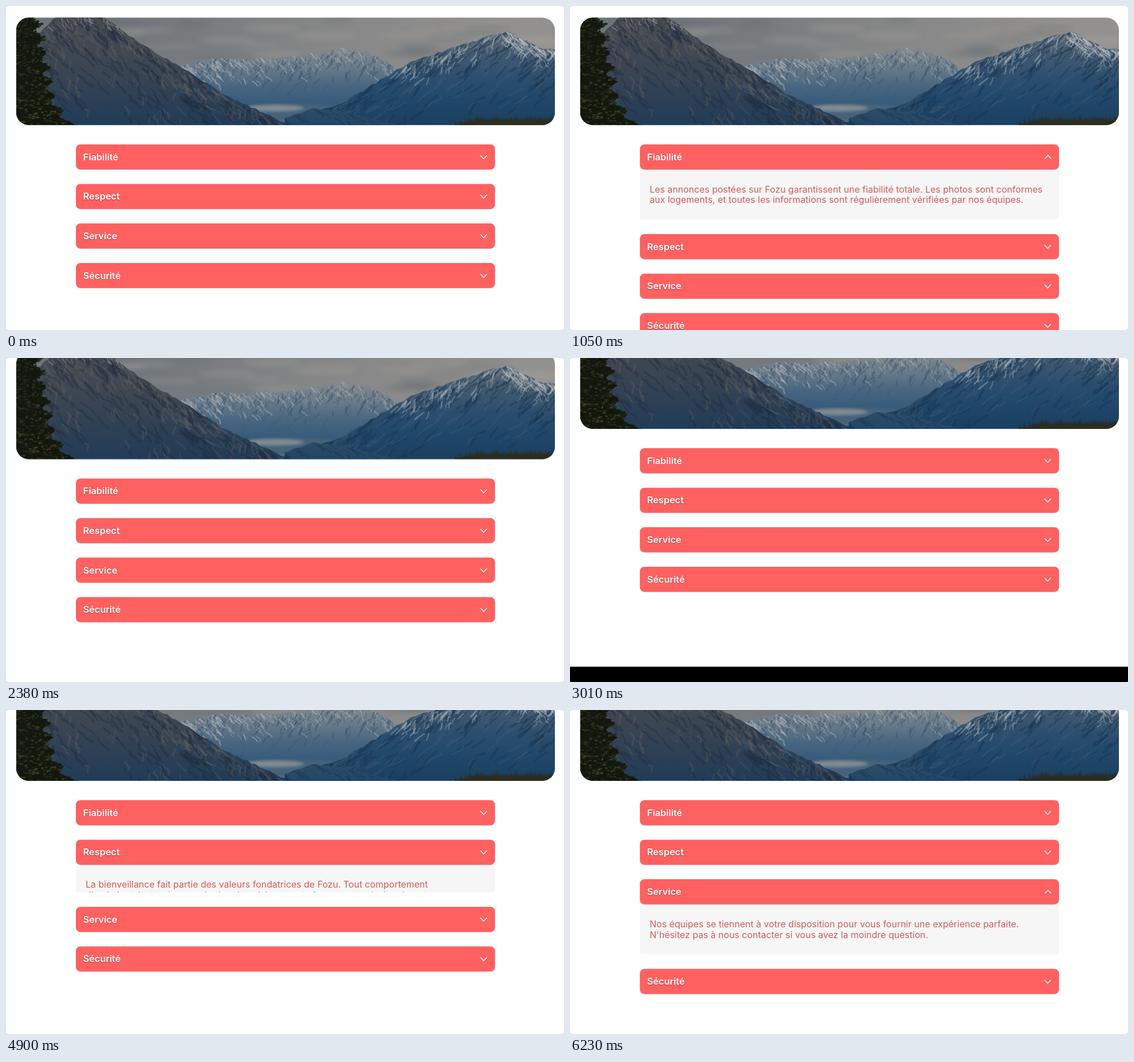
Recreate the animation shown at these times as an HTML page with a canvas. Size 981x571 px, loop 7.63 s.

```html
<!DOCTYPE html>
<html lang="fr">
<head>
<meta charset="utf-8">
<title>Nos valeurs</title>
<style>
html, body { margin: 0; width: 100%; height: 100%; overflow: hidden; background: #fff; }
canvas { display: block; width: 981px; height: 571px; }
</style>
</head>
<body>
<canvas id="stage"></canvas>
<script>
const W = 981, H = 571, LOOP = 7630, TICK = 70;
const OPEN_MS = 400, CLOSE_MS = 540;
const FONT = 'Montserrat, Inter, "Open Sans", sans-serif';
const BANNER = { x: 18, y: 20.5, w: 947, h: 189.2, r: 22 };
const BAR = { x: 123, y: 244, w: 736.6, h: 44, pitch: 69.65, r: 8 };
const LINE = 18.7, PANEL_PAD = 51, FOOTER_Y = 629;
const dpr = window.devicePixelRatio || 1;

const ITEMS = [
  { title: 'Fiabilité', open: 700, close: 1820, lines: [
    'Les annonces postées sur Fozu garantissent une fiabilité totale. Les photos sont conformes',
    'aux logements, et toutes les informations sont régulièrement vérifiées par nos équipes.'] },
  { title: 'Respect', open: 3570, close: 4760, lines: [
    'La bienveillance fait partie des valeurs fondatrices de Fozu. Tout comportement',
    'discriminatoire ou de perturbation du voisinage entraînera une exclusion de notre',
    'plateforme.'] },
  { title: 'Service', open: 5810, close: Infinity, lines: [
    'Nos équipes se tiennent à votre disposition pour vous fournir une expérience parfaite.',
    "N'hésitez pas à nous contacter si vous avez la moindre question."] },
  { title: 'Sécurité', open: Infinity, close: Infinity, lines: [] }
];

function makeCanvas(canvas) {
  canvas.width = W * dpr;
  canvas.height = H * dpr;
  const c = canvas.getContext('2d');
  c.scale(dpr, dpr);
  return c;
}

function roundBox(c, x, y, w, h, r) {
  c.beginPath();
  c.roundRect(x, y, w, h, r);
}

let seed = 41;
function rnd(a = 0, b = 1) {
  seed = (seed * 1664525 + 1013904223) % 4294967296;
  return a + (b - a) * seed / 4294967296;
}

function fade(c, x0, y0, x1, y1, ...colors) {
  const g = c.createLinearGradient(x0, y0, x1, y1);
  colors.forEach((col, i) => g.addColorStop(i / (colors.length - 1), col));
  return g;
}

// Rough skyline through a few key points
function skyline(keys, rough) {
  const line = [];
  for (let i = 1; i < keys.length; i++) {
    const [x0, y0] = keys[i - 1], [x1, y1] = keys[i];
    const n = Math.ceil((x1 - x0) / 8);
    for (let k = 0; k < n; k++) {
      const jitter = k ? rnd(-rough, rough) : 0;
      line.push([x0 + (x1 - x0) * k / n, y0 + (y1 - y0) * k / n + jitter]);
    }
  }
  line.push(keys[keys.length - 1]);
  return line;
}

// Soft strokes running down the slope below a skyline
function slopes(c, line, n, depth, lean, size, color) {
  c.strokeStyle = color;
  for (let i = 0; i < n; i++) {
    let [x, y] = line[Math.floor(rnd(0, line.length))];
    y += rnd() * rnd() * depth;
    c.lineWidth = size * rnd(0.15, 0.4);
    c.beginPath();
    c.moveTo(x, y);
    for (let k = 0; k < 3; k++) {
      x += size * rnd(lean - 0.5, lean + 0.5);
      y += size * rnd(0.3, 0.8);
      c.lineTo(x, y);
    }
    c.stroke();
  }
}

function mountain(c, keys, rough, colors, texture) {
  const line = skyline(keys, rough);
  const top = Math.min(...line.map(p => p[1]));
  c.save();
  c.beginPath();
  line.forEach(p => c.lineTo(...p));
  c.lineTo(line[line.length - 1][0], 210);
  c.lineTo(line[0][0], 210);
  c.closePath();
  c.fillStyle = fade(c, 0, top, 0, 210, ...colors);
  c.fill();
  c.clip();
  texture(line);
  c.restore();
}

function blob(c, x, y, rx, ry, color) {
  c.fillStyle = color;
  c.beginPath();
  c.ellipse(x, y, rx, ry, 0, 0, 7);
  c.fill();
}

function paintSky(c) {
  c.fillStyle = fade(c, 180, 0, 900, 60, '#6d747b', '#858686', '#939190');
  c.fillRect(18, 20, 947, 190);
  c.filter = 'blur(5px)';
  for (let i = 0; i < 30; i++) {
    const color = i % 3 ? 'rgba(163,160,154,.32)' : 'rgba(98,104,110,.3)';
    blob(c, rnd(190, 965), rnd(22, 90), rnd(25, 75), rnd(3, 8), color);
  }
  c.filter = 'none';
}

function paintTree(c) {
  const tones = ['#12170f', '#1b2012', '#2b2c17', '#3d3b1d'];
  for (let y = 18; y < 212; y += 1.5) {
    const reach = 36 + (y - 20) * 0.21 + 7 * Math.sin(y / 4) + Math.max(0, y - 170) * 0.6;
    c.fillStyle = tones[0];
    c.fillRect(18, y, reach - 4, 2);
    for (let k = 0; k < 5; k++) {
      const tone = tones[Math.floor(rnd(0, 2.2 + y / 120))];
      blob(c, 18 + rnd(0, reach), y, rnd(1, 4), rnd(0.8, 2), tone);
    }
  }
}

function paintForest(c) {
  c.fillStyle = '#2b2d20';
  for (let x = 790; x < 967; x += 3) {
    const ground = 200 + Math.max(0, 830 - x) * 0.22;
    c.fillRect(x, ground + 2, 4, 12);
    c.beginPath();
    c.moveTo(x, ground - rnd(2, 9));
    c.lineTo(x + 2.2, ground + 5);
    c.lineTo(x - 2.2, ground + 5);
    c.fill();
  }
}

function paintBanner() {
  const canvas = document.createElement('canvas');
  const c = makeCanvas(canvas);
  const { x, y, w, h, r } = BANNER;
  roundBox(c, x, y, w, h, r);
  c.clip();
  paintSky(c);

  // Distant snowy range
  mountain(c, [[294, 106], [385, 92], [480, 92], [598, 73], [640, 82], [690, 112]], 2.5,
    ['#85898c', '#6b7c8a', '#486681', '#365a7a', '#2d5275'], line => {
      slopes(c, line, 170, 75, -0.3, 8, 'rgba(52,82,110,.4)');
      slopes(c, line, 120, 45, 0.4, 6, 'rgba(172,175,177,.45)');
      slopes(c, line.slice(0, 22), 70, 55, 0.5, 6, 'rgba(178,180,180,.5)');
    });

  // Valley floor
  c.filter = 'blur(2px)';
  blob(c, 500, 186, 105, 14, '#466379');
  blob(c, 472, 180, 52, 6, '#7e8a92');
  blob(c, 520, 203, 60, 3, '#58728a');
  c.filter = 'none';

  // Right-hand range
  mountain(c, [[490, 198], [590, 172], [712, 98], [790, 72], [880, 45], [945, 76], [965, 77]], 2,
    ['#5d6a76', '#425a70', '#2b4e6f', '#1f4769', '#1b3f60'], line => {
      slopes(c, line, 190, 130, -0.6, 11, 'rgba(24,50,78,.4)');
      slopes(c, line, 110, 130, -0.7, 10, 'rgba(76,98,117,.3)');
      slopes(c, line.slice(26), 130, 40, -0.4, 7, 'rgba(176,181,184,.4)');
      slopes(c, line.slice(-14), 60, 42, 0.6, 7, 'rgba(190,192,192,.45)');
    });
  mountain(c, [[490, 198], [540, 180], [600, 188], [690, 210]], 1,
    ['#2d4c67', '#214766'], line => slopes(c, line, 25, 25, 0.7, 8, 'rgba(24,52,78,.4)'));

  // Left-hand mountain
  mountain(c, [[18, 86], [90, 18], [170, 18], [240, 68], [306, 107], [385, 157], [500, 210]], 2,
    ['#464a50', '#424852', '#3a4553', '#2d4055', '#213c58'], line => {
      slopes(c, line, 230, 190, 0.5, 14, 'rgba(29,43,61,.38)');
      slopes(c, line, 200, 190, 0.2, 10, 'rgba(101,93,88,.32)');
      slopes(c, line, 100, 60, 0.7, 8, 'rgba(94,99,106,.32)');
      slopes(c, line.slice(5, 24), 40, 20, 0.4, 5, 'rgba(165,169,173,.4)');
    });

  paintForest(c);
  paintTree(c);
  return canvas;
}

const clamp = v => Math.min(1, Math.max(0, v));
const ease = p => 1 - (1 - p ** 1.3) ** 3;
const progress = (t, from, ms) => ease(clamp((t - from + TICK / 2) / ms));
const scrollAt = t => 85 / (1 + Math.exp((2416 - t) / 68));

function panelHeight(item, t) {
  const shown = progress(t, item.open, OPEN_MS) - progress(t, item.close, CLOSE_MS);
  return t < item.open ? 0 : (item.lines.length * LINE + PANEL_PAD) * shown;
}

const ctx = makeCanvas(document.getElementById('stage'));
const banner = paintBanner();

function drawPanel(item, y, h) {
  ctx.save();
  roundBox(ctx, BAR.x, y, BAR.w, h, Math.min(5, h / 2));
  ctx.fillStyle = '#f6f6f6';
  ctx.fill();
  ctx.clip();
  ctx.fillStyle = '#d15b5b';
  ctx.font = `400 16px ${FONT}`;
  item.lines.forEach((line, i) => ctx.fillText(line, 140, y + 40.6 + i * LINE));
  ctx.restore();
}

function drawBar(item, y, isOpen) {
  ctx.save();
  ctx.shadowColor = 'rgba(0,0,0,.35)';
  ctx.shadowBlur = 1.5 * dpr;
  ctx.shadowOffsetY = 0.4 * dpr;
  roundBox(ctx, BAR.x, y, BAR.w, BAR.h, BAR.r);
  ctx.fillStyle = '#ff6060';
  ctx.fill();
  ctx.fillStyle = '#fff';
  ctx.font = `600 16.4px ${FONT}`;
  ctx.fillText(item.title, 135.5, y + 27.8);
  ctx.restore();

  const cx = isOpen ? 840.4 : 839.8, dy = isOpen ? -3 : 3;
  ctx.beginPath();
  ctx.moveTo(cx - 5.7, y + 22.2 - dy);
  ctx.lineTo(cx, y + 22.2 + dy);
  ctx.lineTo(cx + 5.7, y + 22.2 - dy);
  ctx.strokeStyle = '#fff';
  ctx.lineWidth = 1.5;
  ctx.stroke();
}

function draw(t) {
  let shift = -scrollAt(t);
  ctx.fillStyle = '#fff';
  ctx.fillRect(0, 0, W, H);
  ctx.drawImage(banner, 0, shift, W, H);

  ITEMS.forEach((item, i) => {
    const y = BAR.y + i * BAR.pitch + shift;
    const h = panelHeight(item, t);
    if (h > 0.1) drawPanel(item, y + BAR.h, h);
    drawBar(item, y, t >= item.open && t < item.close);
    shift += h;
  });

  ctx.fillStyle = '#000';
  ctx.fillRect(0, FOOTER_Y + shift, W, H);

  // Window corners
  ctx.fillStyle = '#777';
  for (const x of [0, W - 1]) for (const y of [0, H - 1]) ctx.fillRect(x, y, 1, 1);
}

const start = performance.now();
function frame() {
  const t = (performance.now() - start) % LOOP;
  draw(Math.floor(t / TICK) * TICK);
  requestAnimationFrame(frame);
}
frame();
</script>
</body>
</html>
```
